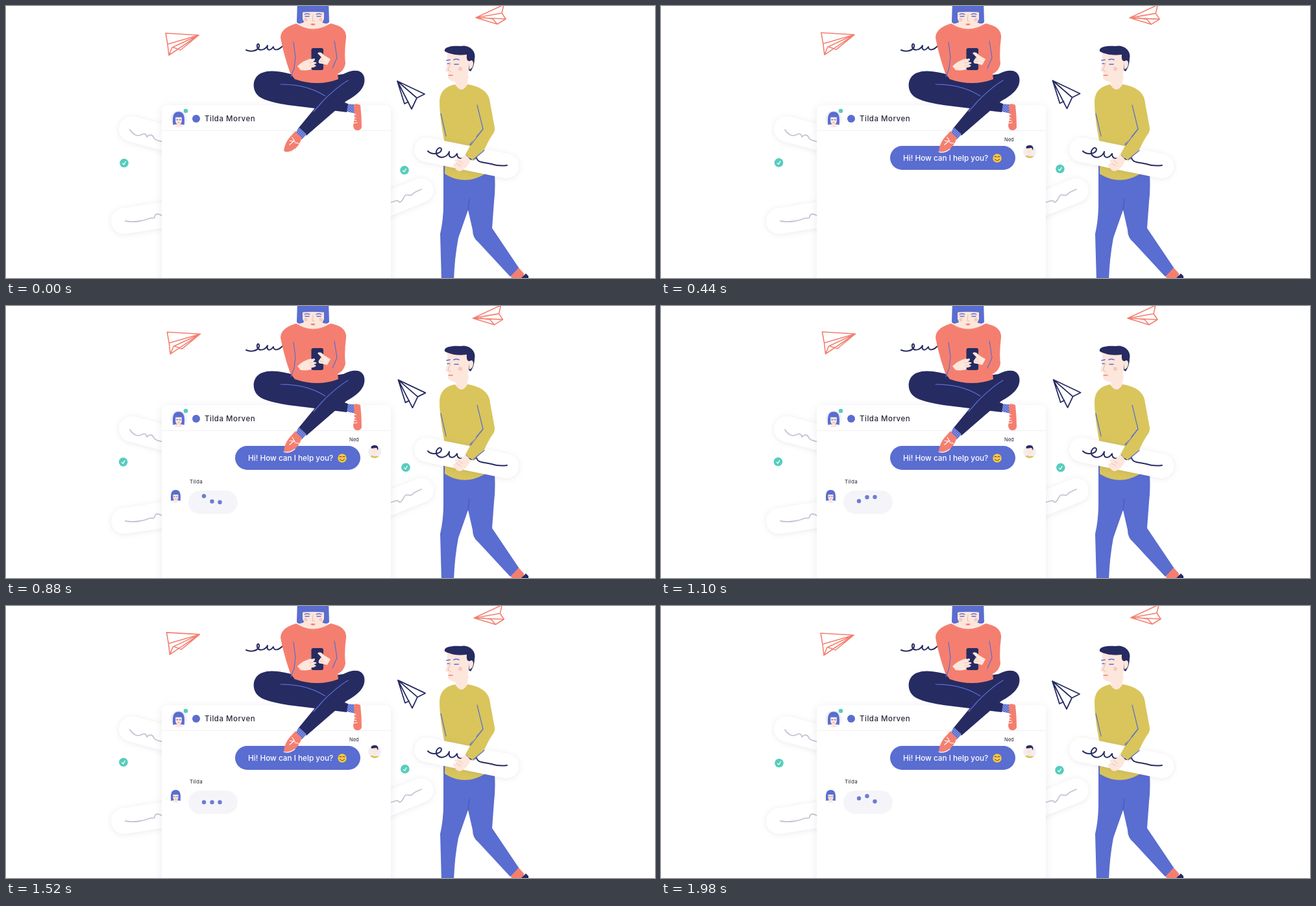
Animation of 1000x420 px, one loop 2 s. Source, as an HTML page:

```html
<!DOCTYPE html>
<html lang="en">
<head>
<meta charset="utf-8">
<title>Chat illustration</title>
<style>
  html, body { margin: 0; width: 100%; height: 100%; overflow: hidden; background: #fff; }
  svg { display: block; width: 100vw; height: 100vh; }
  text { font-family: Inter, sans-serif; fill: #292a38; }
  .line { fill: none; stroke-linecap: round; stroke-linejoin: round; }
  .soft { filter: drop-shadow(0 1px 4px rgba(60, 65, 100, .11)); }
  .coral { fill: #f47f70; }
  .blue { fill: #5a6dd0; }
  .navy { fill: #262b62; }
  .skin { fill: #fde6dc; }
  .mustard { fill: #d9c55c; }
  .crease { stroke: #5a6dd0; stroke-width: 1.2; }
  .ink { stroke: #262b62; stroke-width: 2; }
  .pale { stroke: #c3c4d4; stroke-width: 1.8; }
  .redLine { stroke: #f47f70; stroke-width: 1.6; }
  .lace { stroke: #fff; stroke-width: 1.2; }
</style>
</head>
<body>
<svg viewBox="0 0 1000 420" preserveAspectRatio="none">
  <defs>
    <g id="girlHead">
      <path class="blue" d="M-8 9C-9-3-8-10 0-10S9-3 8 9L5 8H-5Z"/>
      <path class="skin" d="M-4.500-2H4.500V4Q4 7 2 8V10Q4 11 6 12H-6Q-4 11-2 10V8Q-4 7-4.500 4Z"/>
      <path class="line" d="M-3 1.500h2M1 1.500h2" stroke="#5a6dd0" stroke-width="1"/>
      <path class="line" d="M-1 5.500h2" stroke="#f47f70" stroke-width="1"/>
    </g>
    <g id="check">
      <circle r="6.800" fill="#56cdbd"/>
      <path class="line" d="M-2.300 .8L-.4 2.500L2.200-2" stroke="#fff" stroke-width="1.300"/>
    </g>
    <pattern id="dots" width="4" height="4" patternUnits="userSpaceOnUse">
      <rect width="4" height="4" fill="#5a6dd0"/>
      <circle cx="1" cy="1" r=".6" fill="#fff"/><circle cx="3" cy="3" r=".6" fill="#fff"/>
    </pattern>
  </defs>

  <!-- floating messages behind the card -->
  <g class="soft" fill="#fff">
    <rect x="-20" y="-20" width="130" height="40" rx="20" transform="translate(194 190) rotate(15)"/>
    <rect x="-20" y="-20" width="130" height="40" rx="20" transform="translate(182 332) rotate(-9)"/>
    <rect x="-110" y="-19" width="130" height="38" rx="19" transform="translate(639 285) rotate(-22)"/>
  </g>
  <g class="line pale">
    <path d="M191 191C195 198 202 202 208 199C213 196 216 197 217 202C221 198 226 198 228 204C231 208 236 208 242 210"/>
    <path d="M184 332C198 335 214 331 221 328C226 326 228 330 229 325C231 319 237 321 242 325"/>
    <path d="M590 304C599 302 604 298 606 303C611 304 612 294 616 292C621 290 623 295 626 291C629 287 634 286 640 283"/>
  </g>

  <rect x="240" y="153" width="353" height="300" rx="8" fill="#fff" style="filter:drop-shadow(0 2px 6px rgba(60,65,100,.11))"/>
  <path d="M240 192.500H593" stroke="#f0f0f4"/>
  <circle cx="266" cy="174" r="12.500" fill="#f0effa"/>
  <use href="#girlHead" transform="translate(266 174) scale(1.08)"/>
  <circle cx="277" cy="162" r="3.300" fill="#56cdbd"/>
  <circle cx="293" cy="174" r="6" class="blue"/>
  <text x="306" y="178" font-size="11.500" font-weight="500" letter-spacing=".5">Tilda Morven</text>

  <g id="greeting">
    <text x="529" y="209" font-size="7.500">Ned</text>
    <rect x="353" y="216" width="193" height="37" rx="18.500" class="blue"/>
    <text x="373" y="239" font-size="11.750" font-weight="500" style="fill:#fff">Hi! How can I help you?</text>
    <circle cx="518" cy="235" r="6.700" fill="#f8cb48"/>
    <path class="line" d="M514 233q1.500-1.500 3 0M519 233q1.500-1.500 3 0M514.500 236.500q3.500 4.500 7 0" stroke="#6f4b2b" stroke-width="1.100"/>
    <circle cx="568" cy="225" r="10" fill="#f1eff0"/>
    <path class="mustard" d="M561 232Q564 230 568 231T575 232Q568 238 561 232Z"/>
    <path class="skin" d="M563.500 218H572V225L570 228V232H566V229Q563 228 563.500 223Z"/>
    <path class="navy" d="M563 220Q561 216 567 215Q575 214 573 223L571 219Z"/>
  </g>

  <g id="reply">
    <text x="283" y="274" font-size="8" letter-spacing=".3">Tilda</text>
    <use href="#girlHead" transform="translate(261.500 293) scale(.9)"/>
    <rect x="281" y="285" width="76" height="36" rx="18" fill="#f5f5f9"/>
    <circle class="dot" cx="305" cy="303" r="3.200" fill="#6b7dd4"/>
    <circle class="dot" cx="317.500" cy="303" r="3.200" fill="#6b7dd4"/>
    <circle class="dot" cx="329.500" cy="303" r="3.200" fill="#6b7dd4"/>
  </g>

  <!-- seated woman -->
  <g>
    <path class="line ink" d="M370 68C377 71 387 70 390 63C391 57 386 57 387 63C388 69 398 70 403 61C401 69 407 70 412 63C412 69 419 69 426 62"/>
    <path d="M524 151L536 152L538 166L525 163Z" fill="url(#dots)"/>
    <path class="coral" d="M536 152Q541 150 546 153Q548 170 548 187Q547 192 541 192Q535 191 535 184L537 174Z"/>
    <path class="line lace" d="M535 166l4 2M534 171l5 2M535 176l5 1M536 181l5-1"/>
    <path class="navy" d="M446 107C425 101 407 98 395 103C380 108 378 127 387 137C394 145 411 149 435 153L525 164L527 151L480 133L520 108Z"/>
    <path class="navy" d="M455 115L520 105C536 97 549 98 552 110C555 126 542 137 524 147L463 200L451 188L488 143Z"/>
    <path class="line crease" d="M423 121C445 121 468 124 492 139M527 115C511 124 498 137 488 147L474 163"/>
    <path d="M451 187L463 198L456 206L445 199Z" fill="url(#dots)"/>
    <path class="coral" d="M446 193Q450 200 456 203Q452 217 440 225Q431 228 428 223Q430 211 437 203Z"/>
    <path class="line lace" d="M441 203l4 6M437 208l8 1M437 214l6-5M445 211l6 1M428 225q8 3 17-4"/>

    <path class="blue" d="M449-8H497L498 25Q495 28 489 28H457Q450 28 448 25Z"/>
    <path class="skin" d="M446 28Q460 27 462 22H484Q485 27 500 28Q492 41 473 41Q454 41 446 28Z"/>
    <path class="skin" d="M457 5H490V20Q487 30 474 36Q460 30 457 20Z"/>
    <path class="blue" d="M453-4H494V10Q473 8 453 10Z"/>
    <path class="line" d="M460 13q4-2 8 0M478 13q4-2 8 0M461 16h6M479 16h6" stroke="#5a6dd0" stroke-width="1.300"/>
    <path class="line" d="M473 14l-1 9h3" stroke="#eeb9a8"/>
    <path class="coral" d="M469 28q4-2 8 0q-4 4-8 0Z"/>
    <circle cx="462" cy="21" r="2.700" fill="#f9c8b9"/><circle cx="485" cy="21" r="2.700" fill="#f9c8b9"/>

    <path class="coral" d="M447 27Q473 44 500 27C515 30 525 36 524 49Q521 72 523 89Q521 100 511 105L512 113Q480 125 445 113L438 104Q428 76 423 49Q423 34 447 27Z"/>
    <path class="line crease" d="M443 56L446 79L444 96M506 54L510 80L503 96M444 96L439 109"/>
    <path class="skin" d="M449 93Q458 84 470 81L474 84L479 90L478 94Q469 101 454 99Z"/>
    <rect x="470.500" y="65" width="18.500" height="34" rx="3" class="navy"/>
    <path class="skin" d="M500 82L490 76Q484 69 480 73L486 79L482 84Q480 89 486 89L495 91Z"/>
    <path class="skin" d="M466 83L475 81Q478 83 473 86L478 87Q480 89 474 90L478 92Q475 96 466 95Z"/>
    <path class="line" d="M484 80l5 3M483 85l6 1M468 88l5-1M468 92h6" stroke="#efb9a8" stroke-width=".8"/>
  </g>

  <!-- walking man -->
  <g>
    <path class="coral" d="M776 411L789 403L798 413L797 424H780Z"/>
    <path class="navy" d="M790 424L797 417L801 413L805 417V424Z"/>
    <path class="blue" d="M674 246H752Q755 278 752 302L749 343L790 404L777 418L728 365Q719 358 719 346L712 315L697 358Q691 390 690 424H671L669 352Q674 330 674 306Z"/>
    <path class="line" d="M712 315L714 298" stroke="#4455b4"/>
    <path class="skin" d="M692 107H713L709 130Q701 134 694 127Z"/>
    <path class="skin" d="M680 70H716L718 91Q716 97 713 99L710 111Q706 118 697 118Q684 117 681 111L682 103L677 100L680 89Z"/>
    <path class="navy" d="M676 70C674 62 691 61 700 62C712 59 725 68 722 81Q722 92 716 101L713 99L714 85Q709 86 710 75Q691 78 676 70Z"/>
    <path class="skin" d="M713 86Q719 81 720 88Q720 96 714 98Z"/>
    <path class="line" d="M679 84l5-1M690 83q4-2 8 0M680 89h3M691 90h6" stroke="#5a6dd0" stroke-width="1.600"/>
    <path class="line" d="M685 88l-4 11 4 2" stroke="#e9b6a5"/>
    <path class="line" d="M682 107h6" stroke="#f47f70" stroke-width="1.500"/>
    <circle cx="700" cy="97" r="3" fill="#f8c7b8"/>
    <path class="mustard" d="M692 121Q702 137 711 121C730 124 745 132 746 150L753 188Q754 194 748 201L734 225L737 260Q705 278 676 259L677 217Q668 173 668 148Q668 126 692 121Z"/>
    <path class="line crease" d="M670 166L678 201M726 153L735 190L715 214"/>
    <g class="soft"><rect x="-19" y="-19" width="164" height="38" rx="19" fill="#fff" transform="translate(648 222) rotate(11.500)"/></g>
    <path class="line ink" d="M650 224C657 231 671 228 671 221C669 215 660 223 664 230C670 237 680 233 683 225C681 235 689 237 695 228C695 237 704 238 709 230C712 237 720 239 725 234C726 243 739 241 748 244C757 247 765 247 772 246"/>
    <path class="mustard" d="M722 203L750 194L737 222L720 239L708 229Z"/>
    <path class="line crease" d="M737 223L720 237M735 190L716 215"/>
    <path class="skin" d="M708 229L716 238Q711 249 704 253Q699 257 694 253L689 247Q689 242 694 243L691 238Q695 235 701 236Z"/>
    <path class="line" d="M694 243l7 4M698 239l5 4" stroke="#efb9a8" stroke-width=".9"/>
  </g>

  <!-- drifting pieces -->
  <g id="leftPlane" class="line redLine"><path d="M246 42L297 45L249 59ZM297 45L251 76L249 59M297 45L256 64L251 76M297 45L269 68L258 64"/></g>
  <g id="rightPlane" class="line redLine"><path d="M724 18L767-2L764 11ZM764 11L770 20L724 18M724 18L757 28L770 20M736 18L750 20L757 28"/></g>
  <g id="navyPlane" class="line ink" style="stroke-width:1.800"><path d="M603 116L645 136L633 142ZM603 116L625 159L633 142M603 116L614 151L620 148"/></g>
  <g id="leftCheck"><use href="#check" x="182" y="242.500"/></g>
  <g id="rightCheck"><use href="#check" x="614" y="253.500"/></g>
</svg>
<script>
  const LOOP = 2000;
  const byId = id => document.getElementById(id);
  const dots = document.querySelectorAll('.dot');
  const clamp = v => Math.max(0, Math.min(1, v));
  const ease = v => (1 - Math.cos(Math.PI * clamp(v))) / 2;
  const move = (el, x, y) => el.setAttribute('transform', `translate(${x} ${y})`);

  // Out and back within one loop; peak is the moment of the farthest point.
  const drifts = [
    ['leftPlane', 2.5, -2, 1100],
    ['rightPlane', -5, 1, 1100],
    ['navyPlane', 1.6, -2.2, 1150],
    ['leftCheck', -1.6, -2, 1200],
    ['rightCheck', 2, -4.3, 920]
  ].map(([id, x, y, peak]) => ({ el: byId(id), x, y, peak }));

  const messages = [
    { el: byId('greeting'), start: 40 },
    { el: byId('reply'), start: 480 }
  ];

  // Quick rise and slower fall, repeated with a pause.
  function hop(t, peak) {
    const d = t - peak;
    return d < 0 ? ease(1 + d / 175) : ease(1 - d / 300);
  }

  function draw(t) {
    for (const { el, x, y, peak } of drifts) {
      const k = ease(t < peak ? t / peak : (LOOP - t) / (LOOP - peak));
      move(el, x * k, y * k);
    }
    for (const { el, start } of messages) {
      const k = clamp((t - start) / 240);
      el.setAttribute('opacity', k);
      move(el, 0, 4 * (1 - k));
    }
    dots.forEach((dot, i) => {
      const peak = 885 + 130 * i;
      move(dot, 0, -9.5 * Math.max(hop(t, peak), hop(t, peak + 970)));
    });
  }

  function tick() {
    draw(performance.now() % LOOP);
    requestAnimationFrame(tick);
  }
  tick();
</script>
</body>
</html>
```
